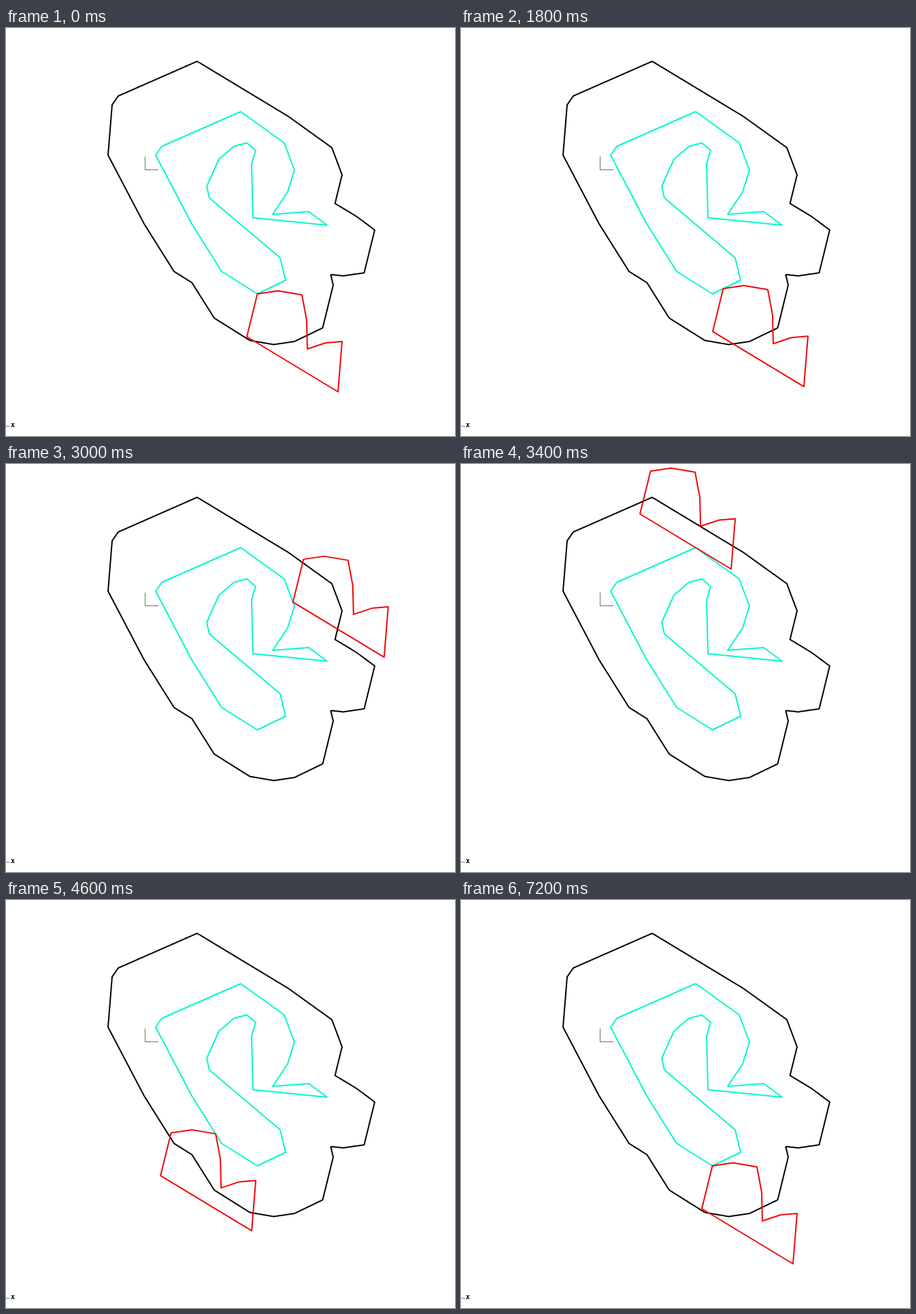
Write an HTML page with a canvas that moves like this. It is 660x600 px and loops after 7400 ms.

```html
<!DOCTYPE html>
<html lang="en">
<head>
<meta charset="utf-8">
<title>Sliding polygon</title>
<style>
  html, body { margin: 0; width: 100%; height: 100%; overflow: hidden; background: #fff; }
  canvas { display: block; }
</style>
</head>
<body>
<canvas id="stage" width="660" height="600"></canvas>
<script>
const ctx = document.getElementById('stage').getContext('2d');
const LOOP = 7400, STEP = 200, RAYS = 1440;
const HOME = [424, 461];    // centre of the moving shape at rest
const MIDDLE = [330, 270];  // point from which the whole track is visible

const fixed = [
  [369.5, 391], [411, 371], [403, 338], [299, 250], [295, 233], [313, 193],
  [335, 174], [354, 169], [367, 180], [361, 200], [363, 279], [472, 290],
  [445, 270], [392, 274], [414, 241], [424, 209], [409, 169], [345, 123],
  [229, 174], [220, 187], [273, 288], [317, 358]
];
const mover = [
  [369.5, 391], [400, 386.5], [435, 392.5], [442, 430], [443, 472],
  [470, 463], [494, 461], [488, 535], [354, 454]
];

// Key points of the motion: time in ms, share of the track covered.
const keys = [[1600, 0], [1800, 0.014], [2600, 0.145], [3000, 0.2845],
  [4000, 0.6985], [4600, 0.8855], [5200, 1]];

const next = (list, i) => list[(i + 1) % list.length];

// Centre of the moving shape when its point m touches the fixed point f.
const contact = (f, m) => [f[0] - m[0] + HOME[0], f[1] - m[1] + HOME[1]];

function contactLines() {
  const lines = [];
  fixed.forEach((f, i) => mover.forEach((m, j) => {
    const p = contact(f, m);
    lines.push([p, contact(next(fixed, i), m)], [p, contact(f, next(mover, j))]);
  }));
  return lines;
}

// The track is the outer edge of all contact lines, found by casting rays.
function buildTrack() {
  const lines = contactLines();
  const [mx, my] = MIDDLE;
  const first = Math.atan2(HOME[1] - my, HOME[0] - mx);
  return Array.from({ length: RAYS + 1 }, (_, i) => {
    const angle = first - i / RAYS * 2 * Math.PI;
    const c = Math.cos(angle), s = Math.sin(angle);
    let reach = 0;
    for (const [a, b] of lines) {
      const sideA = c * (a[1] - my) - s * (a[0] - mx);
      const sideB = c * (b[1] - my) - s * (b[0] - mx);
      if (sideA * sideB > 1e-6 || sideA === sideB) continue;
      const k = sideA / (sideA - sideB);
      const x = a[0] + (b[0] - a[0]) * k - mx;
      const y = a[1] + (b[1] - a[1]) * k - my;
      reach = Math.max(reach, c * x + s * y);
    }
    return [mx + c * reach, my + s * reach];
  });
}

const track = buildTrack();
const lengths = [0];
for (let i = 1; i <= RAYS; i++) {
  const [a, b] = [track[i - 1], track[i]];
  lengths.push(lengths[i - 1] + Math.hypot(b[0] - a[0], b[1] - a[1]));
}

function pointAt(share) {
  const goal = share * lengths[RAYS];
  const i = Math.max(1, lengths.findIndex(len => len >= goal));
  const k = (goal - lengths[i - 1]) / (lengths[i] - lengths[i - 1]);
  const [a, b] = [track[i - 1], track[i]];
  return [a[0] + (b[0] - a[0]) * k, a[1] + (b[1] - a[1]) * k];
}

function slope(i) {
  if (i === 0 || i === keys.length - 1) return 0;
  const [a, b] = [keys[i - 1], keys[i + 1]];
  return (b[1] - a[1]) / (b[0] - a[0]);
}

// Smooth curve through the key points.
function progress(time) {
  const i = keys.findIndex(key => key[0] > time) - 1;
  if (i === -1) return 0;
  if (i < 0) return 1;
  const [[t0, s0], [t1, s1]] = [keys[i], keys[i + 1]];
  const h = t1 - t0, u = (time - t0) / h, v = 1 - u;
  return s0 * v * v * (1 + 2 * u) + s1 * u * u * (3 - 2 * u)
    + h * u * v * (v * slope(i) - u * slope(i + 1));
}

function polygon(points, color, dx = 0, dy = 0) {
  ctx.beginPath();
  for (const [x, y] of points) ctx.lineTo(x + dx, y + dy);
  ctx.closePath();
  ctx.strokeStyle = color;
  ctx.stroke();
}

function bar(x, y, w, h, color) {
  ctx.fillStyle = color;
  ctx.fillRect(x, y, w, h);
}

function draw(time) {
  const now = Math.floor(time % LOOP / STEP) * STEP;
  const [x, y] = pointAt(progress(now));

  bar(0, 0, 660, 600, '#fff');
  bar(204, 189, 1, 20, '#55805a');
  bar(204, 208, 20, 1, '#8a605c');
  bar(0, 585, 6, 1, '#8c8080');
  ctx.fillStyle = '#000';
  ctx.font = 'bold 10px "DejaVu Sans Mono", monospace';
  ctx.fillText('x', 7, 587);

  ctx.lineJoin = 'round';
  ctx.lineWidth = 2;
  polygon(track, '#000');
  polygon(fixed, '#06f6cf');
  polygon(mover, '#f00808', x - HOME[0], y - HOME[1]);
}

const begin = performance.now();
function tick() {
  draw(performance.now() - begin);
  requestAnimationFrame(tick);
}
tick();
</script>
</body>
</html>
```
